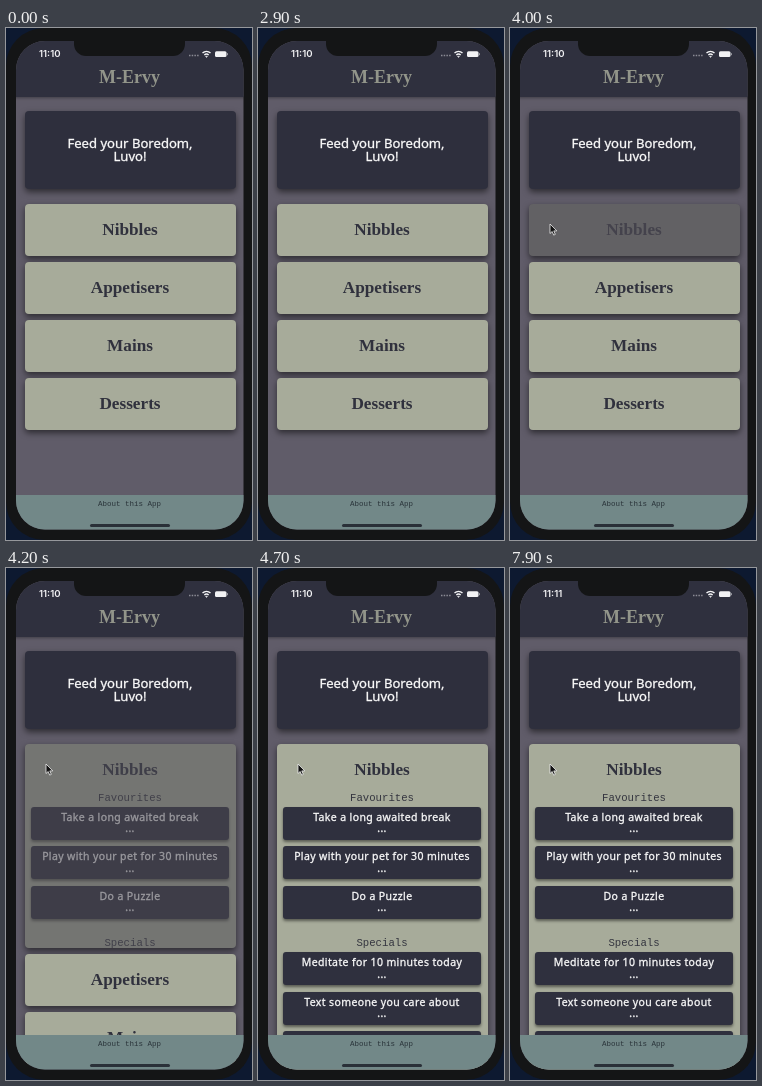
Animation of 246x512 px, one loop 8 s. Source, as an HTML page:

```html
<!DOCTYPE html>
<html lang="en">
<head>
<meta charset="utf-8">
<style>
html, body { margin: 0; width: 100%; height: 100%; overflow: hidden; background: #0d1930; }
div, svg { position: absolute; box-sizing: border-box; }
#phone, #screen { left: 0; top: 0; width: 246px; height: 512px; overflow: hidden; }
#phone { border-radius: 38px; background: #141516; }
#screen { background: #605c69; clip-path: inset(13px 8.5px 10.5px 10px round 29px); }
#header { left: 0; top: 0; width: 246px; height: 69px; background: #2f303e; box-shadow: 0 1px 3px #0005; }
#title { left: 0; top: 38px; width: 246px; height: 22px; font: bold 18px/22px "Liberation Serif", serif; color: #92958a; text-align: center; text-indent: 1px; }
#notch { left: 68px; top: 0; width: 111px; height: 28px; border-radius: 0 0 12px 12px; background: #141516; }
#clock { left: 33px; top: 20px; font: 600 9.6px/12px Inter, sans-serif; color: #f2f2f4; white-space: nowrap; }
#card, .button { left: 18.5px; width: 211px; border-radius: 4px; box-shadow: 0 3px 6px #0008; }
#card { top: 83px; height: 78px; padding-top: 26px; background: #2e2f3d; font: 13.1px/13px "Noto Sans", sans-serif; }
#card, .item { color: #fafafa; -webkit-text-stroke: .3px; text-align: center; white-space: nowrap; }
.button { background: #4b4952; }
.face { inset: 0; border-radius: 4px; overflow: hidden; background: #a7ab9a; }
.name { left: 0; top: 0; width: 100%; height: 52px; font: bold 17.2px/52px "Liberation Serif", serif; color: #30313d; text-align: center; }
.list { left: 0; top: 0; width: 100%; }
.label { left: 0; width: 100%; height: 14px; font: 10.67px/14px "Liberation Mono", monospace; color: #34353f; text-align: center; }
.item { left: 6.5px; width: 198px; height: 33px; padding-top: 5px; border-radius: 3px; background: #2f303e; box-shadow: 0 2px 3px #0007; font: 10.5px/11.5px "Noto Sans", sans-serif; letter-spacing: .38px; }
#footer { left: 0; top: 467px; width: 246px; height: 45px; padding-top: 4px; background: #728888; font: 7.5px/10px "Liberation Mono", monospace; color: #2a343a; text-align: center; text-indent: 1px; }
#home { left: 84px; top: 495.5px; width: 80px; height: 3px; border-radius: 2px; background: #2a3038; }
</style>
</head>
<body>
<div id="phone"></div>
<div id="screen">
  <div id="header"></div>
  <div id="title">M-Ervy</div>
  <div id="notch"></div>
  <div id="clock"></div>
  <svg width="246" height="40" fill="none" stroke="#f2f2f4">
    <path d="M183 27.5h10" stroke="#8b8b95" stroke-width="1.3" stroke-dasharray="1.5 1.2"/>
    <path d="M196.5 25a6 6 0 0 1 8 0M198.3 27a3.4 3.4 0 0 1 4.4 0" stroke-width="1.4"/>
    <path d="M200.5 29.5l-1-1.3h2z" fill="#f2f2f4" stroke-width=".5"/>
    <rect x="209" y="23.3" width="11.5" height="5.6" rx="1.5" fill="#f2f2f4" stroke="none"/>
    <path d="M221.5 25.2v2" stroke="#b4b4ba" stroke-width=".8"/>
  </svg>
  <div id="card">Feed your Boredom,<br>Luvo!</div>
  <div id="menu"></div>
  <div id="footer">About this App</div>
  <div id="home"></div>
  <svg id="cursor" width="10" height="14" viewBox="-1 -1 10 14">
    <path d="M0 0v9.5l2.2-2 1.5 3.6 1.6-.7-1.5-3.5h3z" fill="#111" stroke="#eee" stroke-width=".8"/>
  </svg>
</div>
<script>
const $ = id => document.getElementById(id);
const LOOP = 8000, STEP = 100, CLOSED = 52;
const sections = {
  Favourites: ["Take a long awaited break", "Play with your pet for 30 minutes", "Do a Puzzle"],
  Specials: ["Meditate for 10 minutes today", "Text someone you care about", "Call an old friend"]
};

function add(parent, className, html = "", top) {
  const el = document.createElement("div");
  el.className = className;
  el.innerHTML = html;
  if (top !== undefined) el.style.top = top + "px";
  return parent.appendChild(el);
}

const buttons = ["Nibbles", "Appetisers", "Mains", "Desserts"].map(name => {
  const button = add($("menu"), "button");
  add(add(button, "face"), "name", name);
  return button;
});
const panel = buttons[0].firstChild;
const list = add(panel, "list");
Object.entries(sections).forEach(([label, items], s) => {
  add(list, "label", label, 47 + s * 145);
  items.forEach((text, i) => add(list, "item", text + "<br>...", 62.5 + s * 145.5 + i * 39.5));
});

const panelHeight = t => t < 4200 ? CLOSED : t < 4300 ? 204 : 400;

// Fades on press, then recovers while the panel opens.
function panelOpacity(t) {
  if (t < 3800 || t >= 4400) return 1;
  if (t < 4000) return t < 3900 ? 0.8 : 0.42;
  return t < 4200 ? 0.25 : t < 4300 ? 0.45 : 0.93;
}

function draw(now) {
  const t = Math.floor(now % LOOP / STEP) * STEP;
  const height = panelHeight(t);
  buttons.forEach((button, i) => {
    button.style.top = 176 + i * 58 + (i ? height - CLOSED : 0) + "px";
    button.style.height = (i ? CLOSED : height) + "px";
  });
  list.style.display = height > CLOSED ? "block" : "none";
  panel.style.opacity = panelOpacity(t);
  $("clock").textContent = t < 7900 ? "11:10" : "11:11";

  const left = 1 - Math.min(1, Math.max(0, (t - 2900) / 500));
  $("cursor").style.visibility = t < 3000 ? "hidden" : "visible";
  $("cursor").style.left = 39.3 + 150 * left ** 1.5 + "px";
  $("cursor").style.top = 195 + 400 * left ** 1.5 + "px";
}

function tick() {
  draw(performance.now());
  requestAnimationFrame(tick);
}
tick();
</script>
</body>
</html>
```
